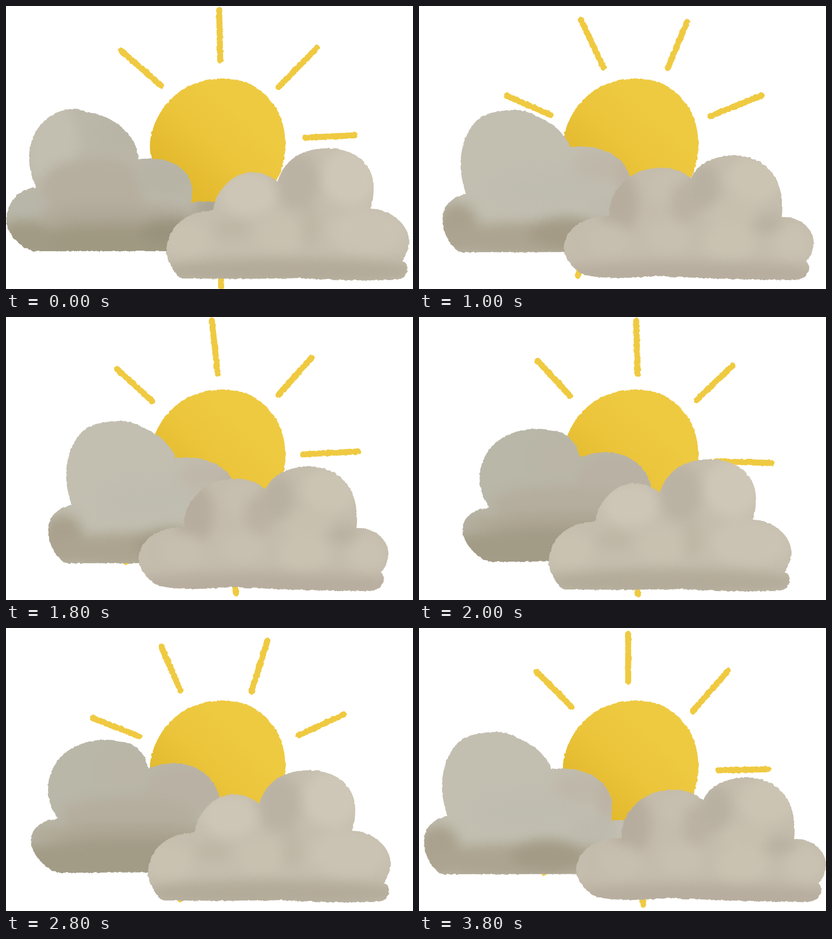
An HTML page for the animation above (4000 ms loop, 775x539 px).

```html
<!DOCTYPE html>
<html lang="en">
<head>
<meta charset="utf-8">
<title>Sun and clouds</title>
<style>
html, body { margin: 0; width: 100%; height: 100%; overflow: hidden; background: #fff; }
svg { display: block; width: 775px; height: 539px; }
</style>
</head>
<body>
<svg id="stage" viewBox="0 0 775 539" xmlns="http://www.w3.org/2000/svg">
  <defs>
    <filter id="rough" filterUnits="userSpaceOnUse" x="-20" y="-10" width="830" height="570" color-interpolation-filters="sRGB">
      <feTurbulence type="fractalNoise" baseFrequency=".16" numOctaves="2" seed="4"/>
      <feDisplacementMap in="SourceGraphic" scale="4" xChannelSelector="R" yChannelSelector="G"/>
    </filter>
    <filter id="soft" filterUnits="userSpaceOnUse" x="-60" y="-10" width="930" height="600" color-interpolation-filters="sRGB">
      <feGaussianBlur stdDeviation="11"/>
    </filter>
    <linearGradient id="gold" gradientUnits="userSpaceOnUse" x1="440" y1="200" x2="325" y2="325">
      <stop offset="0" stop-color="#eeca41"/>
      <stop offset=".5" stop-color="#ebc43a"/>
      <stop offset="1" stop-color="#e3b92d"/>
    </linearGradient>
  </defs>
  <g filter="url(#rough)">
    <path id="rays" fill="none" stroke="#efca41" stroke-width="11.5" stroke-linecap="round"/>
    <path id="disc" fill="url(#gold)"/>
  </g>
  <g id="left"></g>
  <g id="right"></g>
</svg>
<script>
const $ = id => document.getElementById(id);
const STEP = 200, STEPS = 20;

// Each ray: outer angle, outer radius, inner angle, inner radius
const RAYS = [
  [0.2, 260, 1, 165], [44.8, 266, 45.1, 161], [85.2, 260, 84, 166], [130.1, 260, 130.1, 163],
  [179, 266, 179, 163], [-134.4, 259, -134.2, 164], [-91.5, 257, -92.3, 166], [-45.5, 261, -43.3, 160]
];
// Disc radius every 30 degrees, clockwise from the top
const DISC = [127, 133, 132, 129, 130, 128, 128, 128, 128, 129, 126, 126];

// Each puff: x, y, rx, ry, colour
const LEFT = [
  {
    base: "#bbb7a9",
    path: "M51 467C24 458 1 432 1 408C1 375 25 346 58 346C50 330 44 310 44 288C45 240 77 199 127 196C142 197 150 201 167 204C220 217 251 256 252 292C302 284 353 305 355 352L352 375C380 368 420 372 440 400V467Z",
    puffs: [
      [88, 265, 50, 85, "#c2bfb0"], [215, 250, 45, 45, "#b9b5a6"], [165, 345, 100, 55, "#b6ae9f"],
      [305, 325, 60, 40, "#b7b4a6"], [30, 380, 40, 30, "#b7b6a8"], [210, 400, 150, 22, "#b0a898"],
      [215, 452, 250, 38, "#a09982"], [35, 440, 60, 32, "#a19a84"], [310, 430, 55, 24, "#99927c"],
      [395, 388, 35, 28, "#a9a494"]
    ]
  },
  {
    base: "#c2bfb1",
    path: "M33 469C12 455 1 430 1 405C1 378 20 364 45 358C38 335 34 315 35 295C37 260 50 225 78 209C95 202 115 198 138 198C155 198 170 202 180 210C215 225 235 245 243 269C290 262 350 280 358 330V367C385 363 420 370 440 400V468Z",
    puffs: [
      [300, 305, 55, 35, "#bfb8aa"], [350, 325, 18, 45, "#bcb2a4"], [200, 350, 100, 35, "#bfbdb0"],
      [330, 385, 50, 28, "#bdbbae"], [28, 425, 42, 50, "#a9a18d"], [190, 445, 220, 34, "#aca490"],
      [235, 432, 70, 30, "#a39b86"], [400, 385, 40, 28, "#c3bfb2"]
    ]
  },
  {
    base: "#b9b7a8",
    path: "M44 466C15 455 -6 425 -6 404C-4 380 15 366 45 363C34 345 27 328 27 307C27 253 73 213 135 213C185 213 211 230 218 268C275 244 342 262 355 328C365 370 400 380 420 420V464Z",
    puffs: [
      [175, 270, 40, 40, "#bab5a6"], [285, 310, 75, 48, "#b9b1a3"], [180, 355, 130, 32, "#b5ad9e"],
      [200, 390, 220, 16, "#aea693"], [200, 445, 290, 45, "#a29b86"]
    ]
  }
];
const rightFull = {
  base: "#c5beae",
  path: "M305 470C308 428 328 395 394 389C400 347 435 317 469 317C491 318 505 324 517 335C529 296 560 271 612 271C668 271 700 305 700 345C700 362 698 374 694 386C738 388 768 420 768 450C766 465 762 475 754 486C772 492 765 520 745 521C690 524 610 521 560 518C490 520 400 519 335 519C320 512 311 490 305 470Z",
  puffs: [
    [555, 335, 42, 55, "#bab2a3"], [655, 325, 55, 55, "#cec7b7"], [462, 358, 55, 42, "#cdc6b6"],
    [345, 445, 45, 35, "#c9c2b1"], [430, 425, 35, 22, "#bfb7a6"], [520, 435, 42, 36, "#c8c1b0"],
    [580, 420, 18, 40, "#beb7a6"], [690, 430, 75, 45, "#cac3b3"], [540, 506, 260, 26, "#b3ab99"]
  ]
};
const rightFlat = {
  base: "#c4bcac",
  path: "M305 460C307 425 340 400 392 400C388 350 435 309 486 308C515 308 532 316 547 328C560 300 590 285 630 285C690 285 728 330 720 402C755 400 781 425 781 452C779 467 775 478 766 487C780 492 770 522 745 522C680 521 560 519 484 514C430 519 380 520 345 512C325 505 305 480 305 460Z",
  puffs: [
    [410, 375, 38, 60, "#b7ad9e"], [505, 345, 40, 35, "#c6bfaf"], [535, 375, 28, 40, "#bbb2a3"],
    [572, 345, 28, 45, "#b8b0a0"], [670, 330, 55, 45, "#cbc4b3"], [625, 395, 50, 25, "#c7c0af"],
    [695, 415, 30, 18, "#b9b1a1"], [390, 445, 40, 32, "#c6bfaf"], [505, 440, 42, 30, "#c7c0b0"],
    [620, 450, 50, 38, "#c9c2b1"], [740, 450, 38, 35, "#c9c1b1"], [540, 512, 270, 26, "#b7ad9e"]
  ]
};

let clips = 0;
function addCloud(parent, { base, path, puffs }) {
  const clip = "clip" + clips++;
  const shade = puffs.map(([x, y, rx, ry, c]) =>
    `<ellipse cx="${x}" cy="${y}" rx="${rx}" ry="${ry}" fill="${c}"/>`).join("");
  parent.insertAdjacentHTML("beforeend",
    `<g filter="url(#rough)"><clipPath id="${clip}"><path d="${path}"/></clipPath>
     <path d="${path}" fill="${base}"/>
     <g clip-path="url(#${clip})"><g filter="url(#soft)">${shade}</g></g></g>`);
}

function polar(angle, r, cx, cy) {
  const a = angle * Math.PI / 180;
  return [cx + r * Math.sin(a), cy - r * Math.cos(a)];
}

// Closed smooth curve through the points
function smooth(pts) {
  const n = pts.length, at = i => pts[(i + n) % n];
  const handle = (i, sign) => at(i).map((v, k) => v + sign * (at(i + 1)[k] - at(i - 1)[k]) / 6);
  return "M" + pts[0] + pts.map((_, i) =>
    `C${handle(i, 1)} ${handle(i + 1, -1)} ${at(i + 1)}`).join("") + "Z";
}

function show(group, index, dx) {
  group.setAttribute("transform", `translate(${dx} 0)`);
  [...group.children].forEach((g, i) => g.style.display = i === index ? "" : "none");
}

function draw(step) {
  const turn = 90 * step / (STEPS - 1);
  const drift = Math.min(step, STEPS - step);
  const pose = Math.floor(step / 5);
  $("rays").setAttribute("d", RAYS.map(([a, r, b, q]) =>
    `M${polar(a + turn, r, 405, 268)}L${polar(b + turn, q, 405, 268)}`).join(""));
  show($("left"), [0, 1, 2, 1][pose], 8.85 * drift);
  show($("right"), pose % 2, -5.85 * drift);
}

$("disc").setAttribute("d", smooth(DISC.map((r, i) => polar(i * 30, r, 403, 266))));
LEFT.forEach(c => addCloud($("left"), c));
[rightFull, rightFlat].forEach(c => addCloud($("right"), c));

const start = performance.now();
let last = -1;
function tick() {
  const step = Math.floor((performance.now() - start) / STEP) % STEPS;
  if (step !== last) draw(last = step);
  requestAnimationFrame(tick);
}
tick();
</script>
</body>
</html>
```
